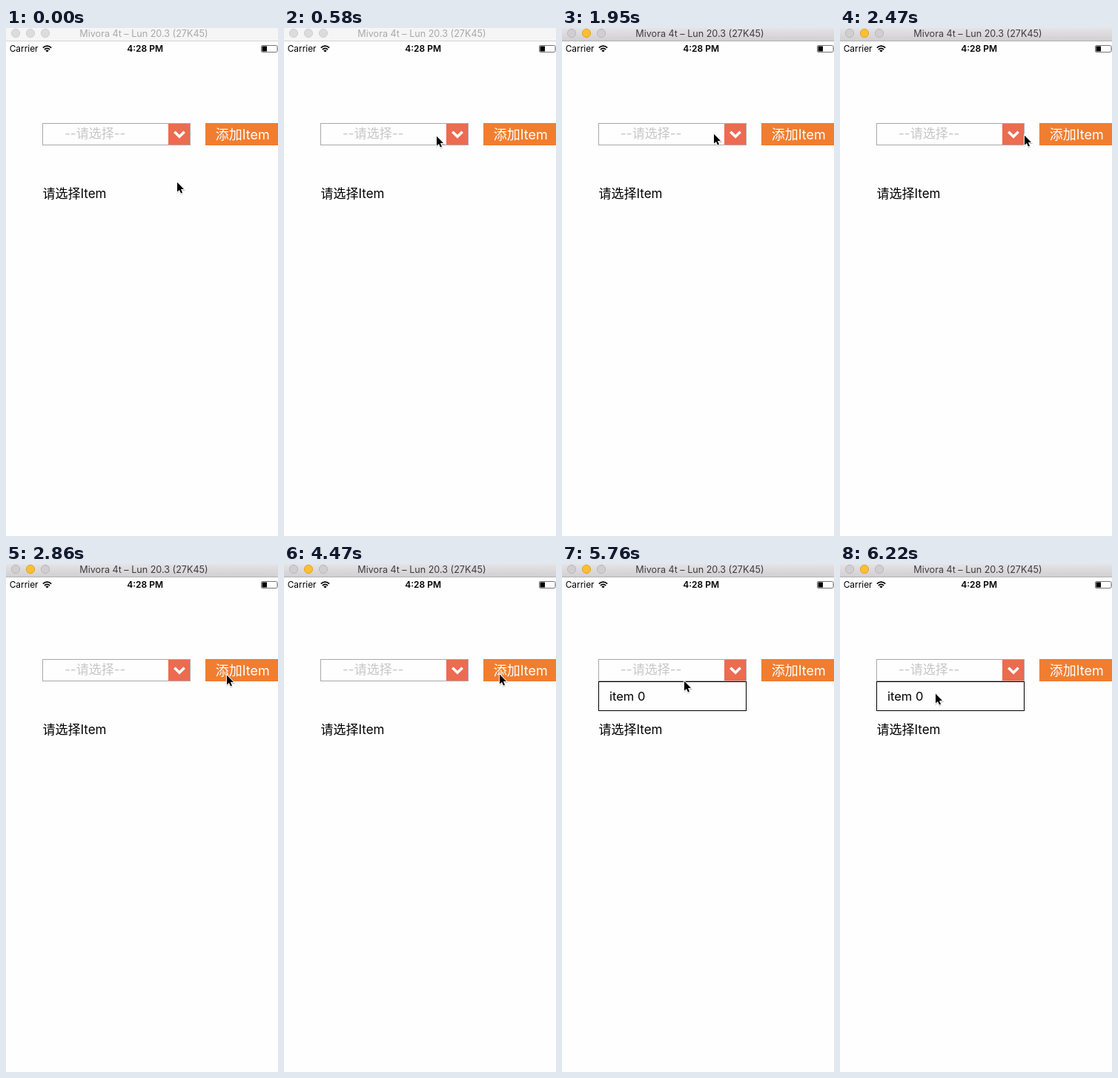
Write an HTML page that moves like this. It is 367 px wide and 684 px high and loops after 8 s.

```html
<!DOCTYPE html>
<html lang="zh-CN">
<head>
<meta charset="utf-8">
<title>Dropdown demo</title>
<style>
  html, body { margin: 0; width: 100%; height: 100%; overflow: hidden; background: #fefefe; }
  svg { display: block; width: 367px; height: 684px; }
  text { font-family: Inter, "Noto Sans CJK SC", "Noto Sans CJK", sans-serif; }
  .bar { fill: #f5f5f5; }
  .edge { fill: #d4d4d4; }
  .light { fill: #dcdcdc; stroke: #cfcfcf; }
  .title { fill: #a8a8a8; font-size: 12.6px; text-anchor: middle; }
  .active .bar { fill: url(#chrome); }
  .active .edge { fill: #b4b2b4; }
  .active .light { fill: #d0ced0; stroke: #b9b7b9; }
  .active .yellow { fill: #fdbe30; stroke: #e0a32c; }
  .active .title { fill: #3d3c3d; }
  .list { fill: #fefefe; stroke: #000; }
</style>
</head>
<body>
<svg viewBox="0 0 367 684">
  <defs>
    <linearGradient id="chrome" x2="0" y2="1">
      <stop stop-color="#e5e3e5"/>
      <stop offset="1" stop-color="#d1cfd1"/>
    </linearGradient>
    <filter id="shadow" x="-50%" y="-50%" width="200%" height="200%">
      <feDropShadow dx="0" dy="1" stdDeviation=".6" flood-opacity=".3"/>
    </filter>
  </defs>
  <rect width="367" height="684" fill="#fefefe"/>

  <g id="window">
    <rect class="bar" width="367" height="17"/>
    <rect class="edge" y="17" width="367" height="1"/>
    <circle class="light" cx="13" cy="7" r="5.6"/>
    <circle class="light yellow" cx="33" cy="7" r="5.6"/>
    <circle class="light" cx="53" cy="7" r="5.6"/>
    <text class="title" x="186" y="12">Mivora 4t – Lun 20.3 (27K45)</text>
  </g>

  <g id="status">
    <text x="4.7" y="32.3" font-size="11.9">Carrier</text>
    <g fill="none" stroke="#000" stroke-width="1.7">
      <path d="M49.8 26.7Q55.5 21.6 61.2 26.7M51.9 29Q55.5 25.9 59.1 29"/>
      <path d="M53.3 30.4Q55.5 28.7 57.7 30.4L55.5 32.6Z" fill="#000" stroke="none"/>
    </g>
    <text x="187.7" y="32.3" font-size="12" font-weight="600" text-anchor="middle">4:28 PM</text>
    <rect x="344.5" y="23.5" width="21.5" height="9" rx="1.5" fill="none" stroke="#777"/>
    <rect x="345.5" y="24.5" width="6.5" height="7"/>
    <rect x="366.5" y="26" width="1" height="4" fill="#777"/>
  </g>

  <g id="select">
    <rect x="49.5" y="128.5" width="199" height="29" fill="#fefefe" stroke="#a9a9a9"/>
    <text x="79" y="148.3" font-size="17" fill="#c7c7c9">--请选择--</text>
    <rect x="219" y="129" width="29" height="28" fill="#ec6b51"/>
    <path d="M227.3 139.8L234 146.3L240.7 139.8" fill="none" stroke="#fff" stroke-width="3.6"/>
  </g>

  <rect x="269" y="128" width="98" height="30" fill="#f17e30"/>
  <text id="add" x="282.7" y="149.7" font-size="18" fill="#fff">添加Item</text>

  <text x="49.5" y="229.2" font-size="17">请选择Item</text>

  <rect id="empty" class="list" x="49.5" y="158.5" width="199" height="49"/>
  <g id="items">
    <rect class="list" x="49.5" y="158.5" width="199" height="39"/>
    <text x="64" y="184" font-size="16.5">item 0</text>
  </g>

  <path id="cursor" d="M1 .8V13.6L4 10.9L6 15.6L8 14.7L6 10.1H10Z"
        stroke="#fff" stroke-width="1.8" paint-order="stroke" filter="url(#shadow)"/>
</svg>
<script>
const LOOP = 8000;
const $ = id => document.getElementById(id);
const smooth = p => p * p * (3 - 2 * p);
const glide = p => 1 - (1 - p) ** 1.77;

// start, end, steps, destination, easing, vertical bend
const moves = [
  { start: 290, end: 640, steps: 7, to: [204, 141], ease: smooth },
  { start: 820, end: 820, steps: 1, to: [204, 142], ease: smooth },
  { start: 2360, end: 2860, steps: 10, to: [297, 149], ease: glide, bend: 2 },
  { start: 4470, end: 4760, steps: 6, to: [198, 141], ease: smooth },
  { start: 5590, end: 5980, steps: 8, to: [129, 173], ease: smooth },
  { start: 6160, end: 6220, steps: 2, to: [128, 174], ease: smooth }
];

function cursorAt(time) {
  let [x, y] = [230, 207];
  for (const { start, end, steps, to, ease, bend = 1 } of moves) {
    if (time < start) break;
    const gap = (end - start) / (steps - 1) || 1;
    const step = Math.min(steps, Math.floor((time - start) / gap + 0.1) + 1);
    const p = ease(step / steps);
    x += (to[0] - x) * p;
    y += (to[1] - y) * p ** bend;
  }
  return [Math.round(x), Math.round(y)];
}

const show = (id, on) => { $(id).style.display = on ? "" : "none"; };

function draw(time) {
  $("window").classList.toggle("active", time >= 1110);
  show("empty", time >= 1170 && time < 1950);
  show("items", time >= 5120);
  $("add").style.opacity = time >= 3760 && time < 3930 ? 0.3 : 1;
  $("cursor").setAttribute("transform", `translate(${cursorAt(time)})`);
}

const origin = performance.now();
function tick() {
  draw((performance.now() - origin) % LOOP);
  requestAnimationFrame(tick);
}
tick();
</script>
</body>
</html>
```
